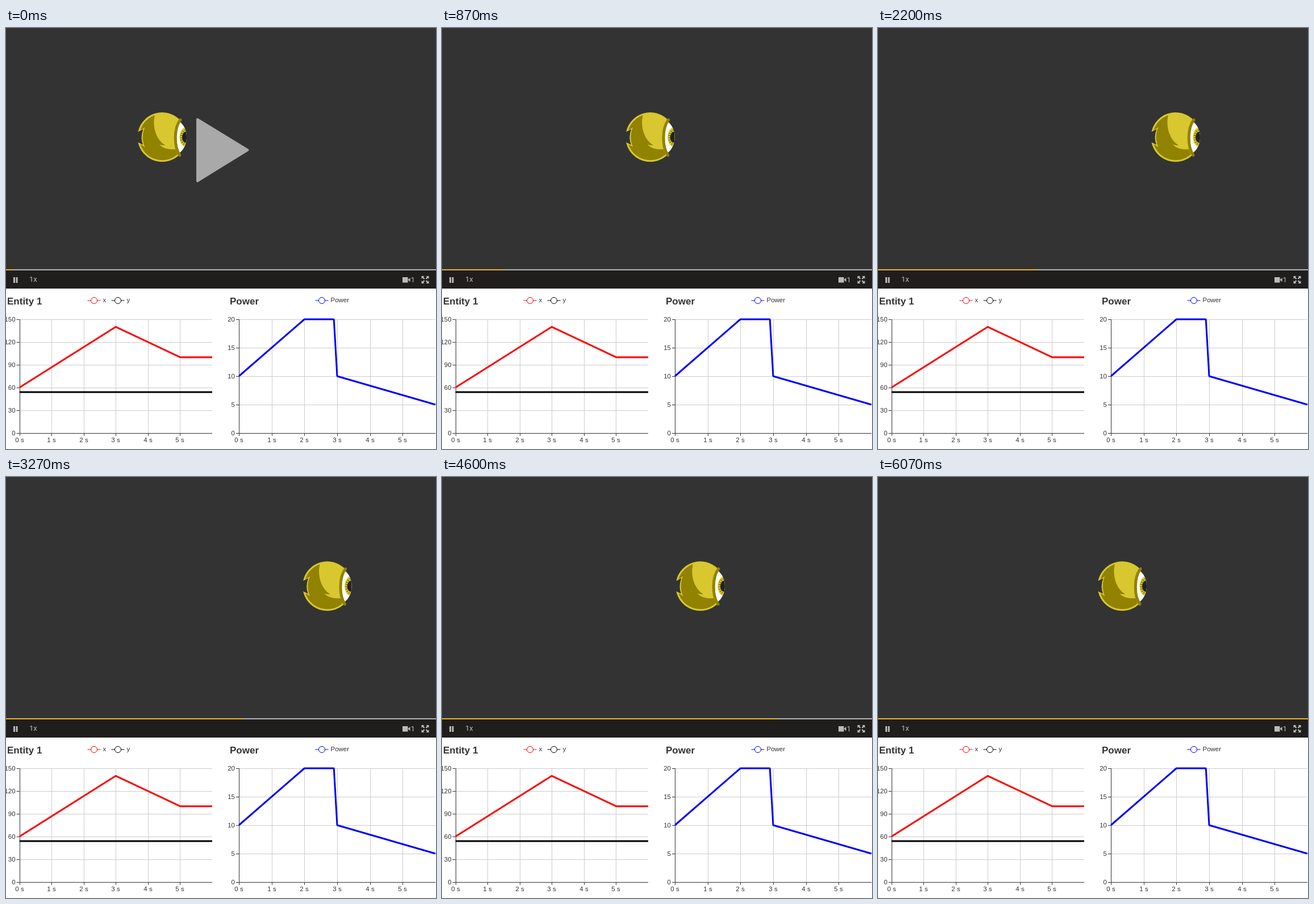
These frames come from a looping animation (757 by 740 pixels, 6.34 s). An HTML page:

```html
<!DOCTYPE html>
<html lang="en">
<head>
<meta charset="utf-8">
<title>Replay player</title>
<style>
html, body { margin: 0; width: 100%; height: 100%; overflow: hidden; background: #fff; }
svg { display: block; width: 757px; height: 740px; font: 11.5px Arial, "Liberation Sans", sans-serif; fill: #333; }
.ui { font: 13px Roboto, sans-serif; fill: #bbb; }
.title { font-size: 17px; font-weight: bold; }
.grid { stroke: #ccc; }
.axis { stroke: #333; }
.data { fill: none; stroke-width: 3; stroke-linejoin: bevel; }
</style>
</head>
<body>
<svg viewBox="0 0 757 740">
  <clipPath id="sclera"><path id="white" d="M306 165C299 180 299 205 305 220C313 214 318 203 318 192C318 180 313 170 306 165Z"/></clipPath>
  <rect width="757" height="425" fill="#333"/>
  <g id="eye">
    <path fill="#d8c72e" d="M232.500 182.500A43.300 43.300 0 0 1 306 161.500L304 224A43.300 43.300 0 0 1 232.500 201L241 205Q236 192 241.500 178Z"/>
    <path fill="#918200" d="M236.300 180A40.500 40.500 0 0 1 262 153.300C258 168 261 194 280 206Q275 206.500 270 205C277 212 287 214 298 213L302 222A40.500 40.500 0 0 1 236.400 204L244.500 209.500Q237 192 244.500 174.500Z"/>
    <use href="#white" fill="#fff"/>
    <g clip-path="url(#sclera)">
      <ellipse cx="317" cy="192" rx="11.500" ry="17.500" fill="#d8c72e"/>
      <ellipse cx="317" cy="192" rx="8.500" ry="13" fill="none" stroke="#918200" stroke-width="3.500" stroke-dasharray="2 2"/>
      <ellipse cx="317" cy="192" rx="7" ry="10" fill="#222"/>
    </g>
    <path fill="none" stroke="#918200" stroke-width="5" stroke-linecap="round" d="M307 161.500C295.500 176 295.500 209 306 223.500"/>
  </g>
  <path id="play" d="M337 160.500L425.500 214.500L337 269Z" fill="#fff" stroke="#fff" stroke-width="4" stroke-linejoin="round"/>

  <rect y="424" width="757" height="34" fill="#1f1e1d"/>
  <rect y="424" width="757" height="2" fill="#b5b3b8"/>
  <rect id="bar" y="424" height="2" fill="#ecb42c"/>
  <g class="ui">
    <path d="M13 438h3v10h-3zM17.500 438h3v10h-3zM698 438h9.500v9.500H698zM707.500 442.500l4-3.500v7.500z"/>
    <text x="41" y="446">1x</text>
    <text x="712.500" y="446.500">1</text>
    <g id="corners" transform="translate(738 442.500)"></g>
  </g>
  <g id="charts"></g>
</svg>
<script>
const $ = id => document.getElementById(id);
const LOOP = 6340, TICK = 200 / 3;

const line = (x1, y1, x2, y2, cls) => `<path class="${cls}" d="M${x1} ${y1}L${x2} ${y2}"/>`;
const text = (x, y, s, anchor = "start", cls = "") =>
  `<text x="${x}" y="${y}" text-anchor="${anchor}" class="${cls}">${s}</text>`;

function legend(x, color, name) {
  return `<g stroke="${color}" fill="#fff"><path d="M${x - 11.5} 479h23"/>
    <circle cx="${x}" cy="479" r="5.500"/></g>` + text(x + 15.5, 482, name);
}

function chart({ title, titleX, left, right, max, step, series }) {
  const px = s => left + s * (right - left) / 6;
  const py = v => 712 - v * 200 / max;
  const snap = v => Math.round(v) + 0.5;
  let out = text(titleX, 486, title, "start", "title");
  for (let v = 0; v <= max; v += step) {
    const y = snap(py(v));
    if (v) out += line(left, y, right, y, "grid");
    out += line(left - 5, y, left, y, "axis") + text(left - 7, y + 3.5, v, "end");
  }
  for (let s = 0; s < 6; s++) {
    const x = snap(px(s));
    if (s) out += line(x, 512, x, 712, "grid");
    out += line(x, 712, x, 717, "axis") + text(x - 0.5, 727.5, s + " s", "middle");
  }
  out += line(snap(left), 512, snap(left), 712, "axis") + line(left, 712.5, right, 712.5, "axis");
  for (const { name, color, at, points } of series) {
    const list = points.map(([s, v]) => px(s) + "," + py(v)).join(" ");
    out += `<polyline class="data" stroke="${color}" points="${list}"/>` + legend(at, color, name);
  }
  return out;
}

$("charts").innerHTML = chart({
  title: "Entity 1", titleX: 2, left: 23.6, right: 363, max: 150, step: 30,
  series: [
    { name: "x", color: "#f00", at: 155, points: [[0, 60], [3, 140], [5, 100], [6, 100]] },
    { name: "y", color: "#000", at: 197, points: [[0, 54], [6, 54]] }
  ]
}) + chart({
  title: "Power", titleX: 394, left: 410, right: 756, max: 20, step: 5,
  series: [{ name: "Power", color: "#00f", at: 556, points: [[0, 10], [2, 20], [2.9, 20], [3, 10], [6, 5]] }]
});

$("corners").innerHTML = [0, 90, 180, 270].map(a =>
  `<path transform="rotate(${a})" d="M-6.500-6.500h5l-1.700 1.700 2.500 2.500-1.600 1.600-2.500-2.500-1.700 1.700z"/>`).join("");

// Straight motion through a few [time, value] points, held after the last
function along(points, t) {
  const i = points.findIndex(p => p[0] > t);
  if (i < 0) return points.at(-1)[1];
  const [t0, v0] = points[i - 1], [t1, v1] = points[i];
  return v0 + (v1 - v0) * (t - t0) / (t1 - t0);
}
const eyePath = [[0, 232], [530, 284], [2200, 481], [2865, 556], [4900, 387]];
const barPath = [[0, 13.5], [530, 66], [2200, 280], [5870, 755], [5900, 757]];

// Smooth at first, then a stall, then ever longer steps
function stepped(t) {
  const tick = Math.floor((t + 4) / TICK);
  if (tick < 33) return Math.min(tick, 25) * TICK;
  let k = 0, last = 33;
  for (let next = 33; next <= tick; next = Math.floor(33 + 2.2 * k + 0.0155 * k * k)) {
    last = next;
    k++;
  }
  return last * TICK;
}

function draw(now) {
  const t = stepped(now % LOOP);
  $("eye").setAttribute("transform", `translate(${along(eyePath, t) - 232})`);
  $("bar").setAttribute("width", along(barPath, t));
  $("play").setAttribute("opacity", Math.max(0, 0.58 * (1 - t / 330)));
  requestAnimationFrame(draw);
}
draw(0);
</script>
</body>
</html>
```
